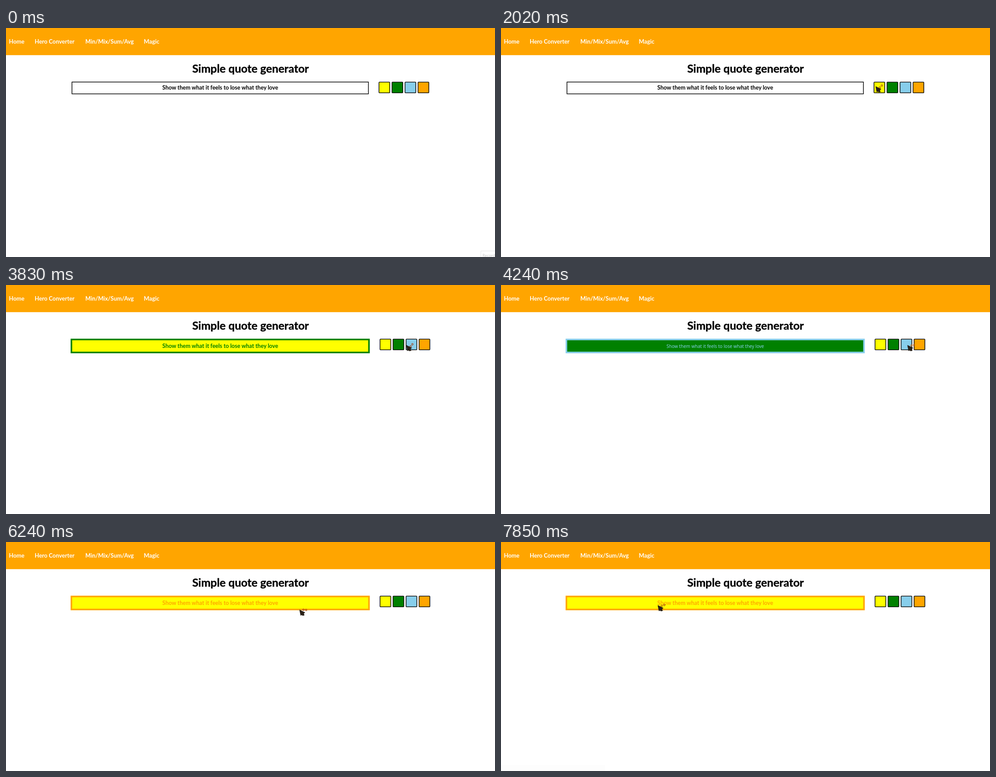
An HTML page for the animation above (8 s loop, 1091 by 513 pixels).

```html
<!DOCTYPE html>
<html lang="en">
<head>
<meta charset="utf-8">
<title>Simple quote generator</title>
<style>
  html, body { margin: 0; width: 100%; height: 100%; overflow: hidden; background: #fff; }
  svg { display: block; width: 1091px; height: 513px; font: 700 12.8px Lato, sans-serif; }
  #nav { fill: #fff; }
  #swatches rect { stroke: #111; stroke-width: 1.6; }
  #title, #quote { text-anchor: middle; }
  #title { font-size: 25px; stroke: #000; stroke-width: .35; stroke-linejoin: round; }
  #record text { font: 8.6px 'Open Sans', sans-serif; fill: #c4c4c4; }
  #rings { fill: none; stroke-width: 1.1; }
</style>
</head>
<body>
<svg viewBox="0 0 1091 513">
  <rect width="1091" height="60.8" fill="orange"/>
  <g id="nav">
    <text x="6.5" y="34.5">Home</text>
    <text x="64" y="34.5">Hero Converter</text>
    <text x="177" y="34.5">Min/Mix/Sum/Avg</text>
    <text x="307.5" y="34.5">Magic</text>
  </g>
  <text id="title" x="545.5" y="99.5">Simple quote generator</text>
  <rect id="box"/>
  <text id="quote" x="478">Show them what it feels to lose what they love</text>
  <g id="swatches"></g>
  <g id="record">
    <rect x="1059.5" y="499.5" width="40" height="20" fill="none" stroke="#e4e4e4"/>
    <text x="1063" y="512.5">Record</text>
  </g>
  <rect id="status" y="500" width="232" height="13" fill="#fdfdfd"/>
  <g id="cursor">
    <path d="M0 0L12 6L9 8L10.5 12L6.5 12.8L5 11L2.5 12.5Z" fill="#2b2118" stroke="#1a1510" stroke-width=".8" stroke-linejoin="round"/>
    <g id="rings"><circle cx="-3" r="1.8"/><circle cx="3" r="1.8"/></g>
  </g>
</svg>
<script>
const LOOP = 8000, STEPS = 40, STEP = 201.3;
const $ = id => document.getElementById(id);
const set = (id, attrs) => {
  for (const key in attrs) $(id).setAttribute(key, attrs[key]);
};
const show = (id, on) => set(id, { visibility: on ? 'visible' : 'hidden' });

$('swatches').innerHTML = ['yellow', 'green', 'skyblue', 'orange'].map((fill, i) =>
  `<rect x="${832.2 + 29.05 * i}" y="121.2" width="24" height="24" rx="1" fill="${fill}"/>`).join('');

const round = '700 12.5px Lato, sans-serif';
const serif = "9.5px 'Noto Serif', serif";
const sans = "10.05px 'Noto Sans', sans-serif";
const themes = [
  { from: 0, ink: 'black', back: 'white', font: round },
  { from: 11, ink: 'yellow', back: 'green', font: serif },
  { from: 17, ink: 'green', back: 'yellow', font: round },
  { from: 20, ink: 'skyblue', back: 'green', font: sans },
  { from: 25, ink: 'orange', back: 'yellow', font: round }
];

// step at which the pointer tip reaches x, y
const stops = [
  [0, 1060, 505], [3, 779, 318], [6, 826, 157], [10, 836, 131], [16, 868, 135], [21, 907, 135],
  [26, 933, 136], [30, 930, 137], [31, 655, 152], [33, 320, 27], [36, 338, 142], [39, 350, 142]
];

function pointer(step) {
  const i = Math.max(1, stops.findIndex(s => s[0] >= step));
  const [t0, x0, y0] = stops[i - 1], [t1, x1, y1] = stops[i];
  const u = (step - t0) / (t1 - t0), e = u * u * (3 - 2 * u);
  return [x0 + (x1 - x0) * e, y0 + (y1 - y0) * e];
}

function draw(ms) {
  const step = Math.min(STEPS - 1, Math.floor((ms % LOOP + 15) / STEP));
  const theme = themes.findLast(t => step >= t.from);
  const plain = theme === themes[0];
  const edge = plain ? 1.5 : 3.5;
  const grow = plain ? 0 : 2.3;

  set('box', {
    x: 146.5 - grow + edge / 2, y: 120.3 + edge / 2,
    width: 662.8 + 2 * grow - edge, height: 28 + 2 * grow - edge,
    fill: theme.back, stroke: theme.ink, 'stroke-width': edge
  });
  set('quote', { y: 138.4 + grow, fill: theme.ink });
  $('quote').style.font = theme.font;
  set('swatches', { transform: `translate(${grow} 0)` });
  show('record', step < 1);
  show('status', step >= 33);

  show('cursor', step > 0);
  set('cursor', { transform: `translate(${pointer(step)})` });
  set('rings', {
    transform: `translate(11.5 0) rotate(${19.5 * step - 60})`,
    stroke: theme.back === 'green' ? '#d9701c' : '#a33a10'
  });
}

const start = performance.now();
function tick() {
  draw(performance.now() - start);
  requestAnimationFrame(tick);
}
tick();
</script>
</body>
</html>
```
